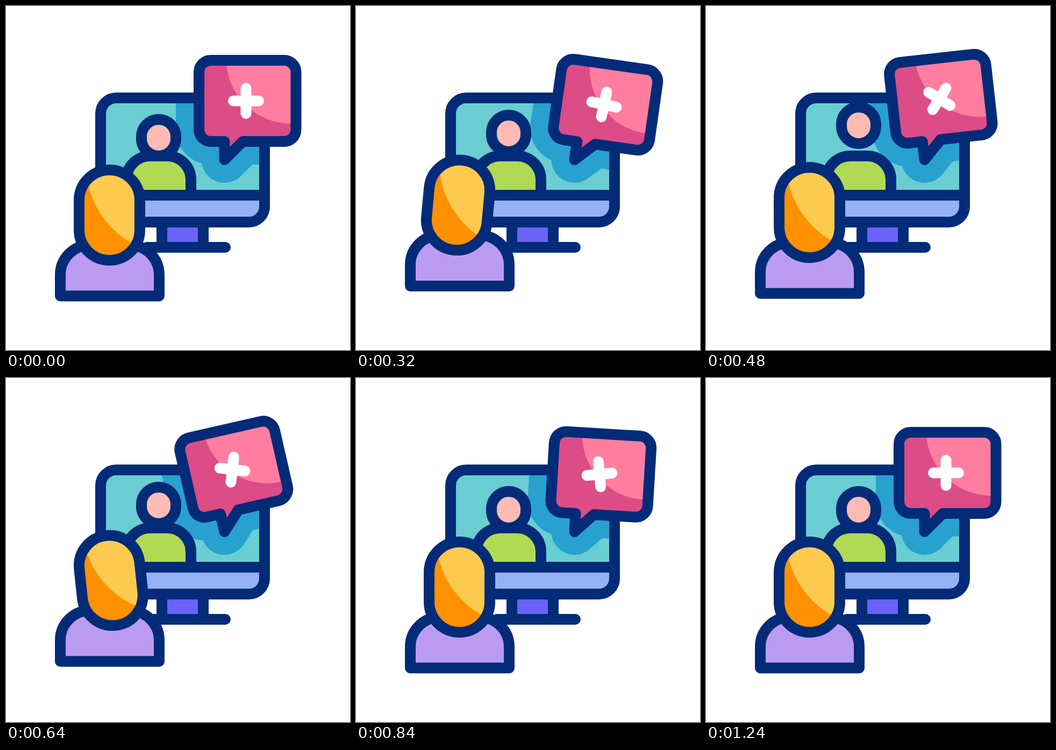
These frames come from a looping animation (640x640 px, 1360 ms). An HTML page:

```html
<!DOCTYPE html>
<html lang="en">
<head>
<meta charset="utf-8">
<title>Online consultation</title>
<style>
  html, body { margin: 0; width: 100%; height: 100%; overflow: hidden; background: #fff; }
  svg { display: block; width: 100vw; height: 100vh; }
  .line { stroke: #032b78; stroke-width: 20; stroke-linecap: round; stroke-linejoin: round; }
</style>
</head>
<body>
<svg viewBox="0 0 640 640">
  <defs>
    <path id="bubble" d="M381 101H517.5A22 22 0 0 1 539.5 123V230A22 22 0 0 1 517.5 252H440.5L406.5 286V252H381A22 22 0 0 1 359 230V123A22 22 0 0 1 381 101Z"/>
    <rect id="hair" x="136" y="305" width="113" height="168" rx="56.5"/>
    <clipPath id="screenClip"><rect x="186" y="181" width="285" height="171"/></clipPath>
    <clipPath id="bubbleClip"><use href="#bubble"/></clipPath>
    <clipPath id="hairClip"><use href="#hair"/></clipPath>
  </defs>

  <g class="line" fill="none">
    <path d="M290 402H367V449H290Z" fill="#6a62fa"/>
    <path d="M262 449H408"/>
  </g>

  <rect x="176" y="171" width="305" height="231" rx="29" fill="#69cdd2"/>
  <g clip-path="url(#screenClip)">
    <use id="shade" href="#bubble" fill="#28a1cf" stroke="#28a1cf" stroke-width="86" stroke-linejoin="round"/>
  </g>
  <path d="M176 352H481V373A29 29 0 0 1 452 402H205A29 29 0 0 1 176 373Z" fill="#95b1f3"/>
  <path class="line" d="M224 352V323A44 44 0 0 1 268 279H300A44 44 0 0 1 344 323V352Z" fill="#b0da53"/>
  <rect id="doctor" class="line" x="252" y="211" width="64" height="68" rx="32" fill="#ffbbb3"/>
  <g class="line" fill="none">
    <path d="M176 352H481"/>
    <rect x="176" y="171" width="305" height="231" rx="29"/>
  </g>

  <g id="talk">
    <use href="#bubble" fill="#dc4c86"/>
    <circle cx="531" cy="97.5" r="121.5" fill="#ff7ea0" clip-path="url(#bubbleClip)"/>
    <use href="#bubble" class="line" fill="none"/>
    <path id="plus" d="M423 176.500H470M446.500 153V200" stroke="#fff" stroke-width="20" stroke-linecap="round"/>
  </g>

  <g id="patient">
    <path class="line" d="M101 539.500V500A55 55 0 0 1 156 445H230A55 55 0 0 1 285 500V539.500Z" fill="#bb9bf1"/>
    <g id="head">
      <use href="#hair" fill="#ff9100"/>
      <circle cx="316" cy="296" r="167" fill="#fdca50" clip-path="url(#hairClip)"/>
      <use href="#hair" class="line" fill="none"/>
    </g>
  </g>
</svg>
<script>
  const LOOP = 1360, STEP = 40;
  const el = id => document.getElementById(id);
  const parts = Object.fromEntries(
    ["shade", "talk", "plus", "doctor", "patient", "head"].map(id => [id, el(id)]));

  // [time in ms, value] pairs
  const tracks = {
    bubble: [[55, 0], [300, 8.2], [604, -13.3], [880, 4], [1150, 0]],
    plus: [[229, 0], [970, 180]],
    doctor: [[204, 0], [480, -23], [756, 0]],
    hop: [[25, 0], [180, -18.5], [310, -18.5], [520, -4], [660, -12.5], [830, 0]],
    tilt: [[200, 0], [363, 6], [600, -6.5], [800, 0]]
  };

  // Ease in and out along cubic-bezier(.5, 0, .5, 1)
  function ease(x) {
    let lo = 0, hi = 1;
    for (let i = 0; i < 24; i++) {
      const s = (lo + hi) / 2;
      if (1.5 * s * (1 - s) + s * s * s < x) lo = s; else hi = s;
    }
    return lo * lo * (3 - 2 * lo);
  }

  function valueAt(keys, t) {
    if (t <= keys[0][0]) return keys[0][1];
    for (let i = 1; i < keys.length; i++) {
      const [t0, a] = keys[i - 1], [t1, b] = keys[i];
      if (t < t1) return a + (b - a) * ease((t - t0) / (t1 - t0));
    }
    return keys[keys.length - 1][1];
  }

  const move = (node, y) => node.setAttribute("transform", `translate(0 ${y})`);
  const turn = (node, angle, x, y) => node.setAttribute("transform", `rotate(${angle} ${x} ${y})`);

  function draw(t) {
    const swing = valueAt(tracks.bubble, t);
    turn(parts.talk, swing, 406.5, 286);
    turn(parts.shade, swing, 406.5, 286);
    turn(parts.plus, valueAt(tracks.plus, t), 446.5, 176.5);
    move(parts.doctor, valueAt(tracks.doctor, t));
    move(parts.patient, valueAt(tracks.hop, t));
    turn(parts.head, valueAt(tracks.tilt, t), 192.5, 361.5);
  }

  const start = performance.now();
  function tick() {
    const t = (performance.now() - start) % LOOP;
    draw(Math.floor(t / STEP) * STEP);
    requestAnimationFrame(tick);
  }
  draw(0);
  requestAnimationFrame(tick);
</script>
</body>
</html>
```
